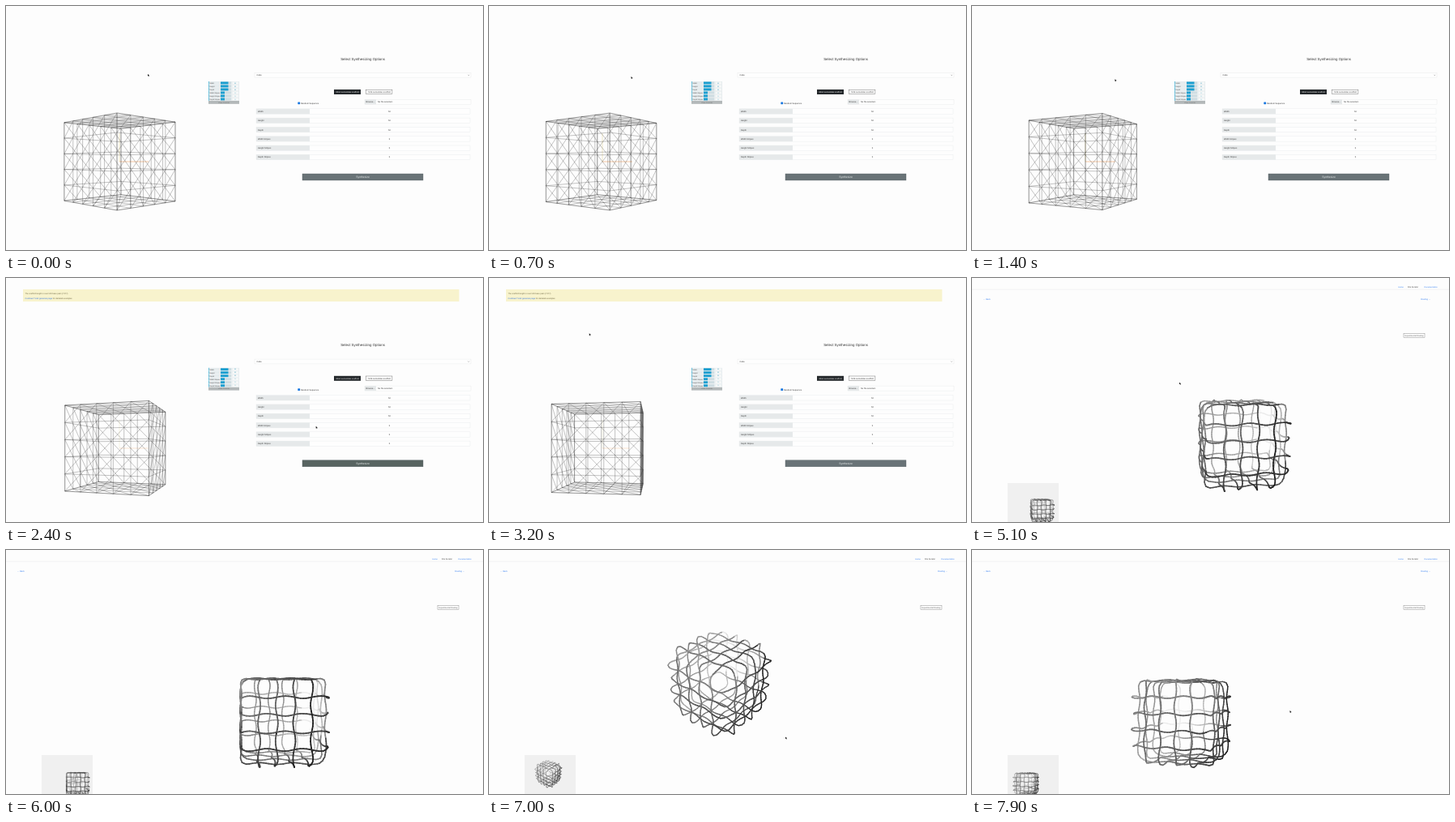
These frames come from a looping animation (589 px wide and 301 px high, 8000 ms). An HTML page with a canvas:

```html
<!DOCTYPE html>
<html>
<head>
<meta charset="utf-8">
<style>
  html, body { margin: 0; width: 100%; height: 100%; overflow: hidden; background: #fdfdfd; }
  canvas, svg { position: absolute; left: 0; top: 0; width: 589px; height: 301px; }
  text { font-family: "Liberation Sans", Arial, sans-serif; text-rendering: geometricPrecision; }
</style>
</head>
<body>
<canvas id="stage" width="589" height="301"></canvas>
<svg id="ui" viewBox="0 0 589 301"></svg>
<script>
const LOOP = 8000, ALERT = 2100, FOCUS_END = 2800, HOVER = 3600, RESULT = 4200;
const ctx = document.getElementById('stage').getContext('2d');
const ui = document.getElementById('ui');

// ---- static interface ----
const rect = (x, y, w, h, fill, stroke = 'none', extra = '') =>
  `<rect x="${x}" y="${y}" width="${w}" height="${h}" fill="${fill}" stroke="${stroke}" stroke-width=".4" ${extra}/>`;
const text = (x, y, size, str, fill = '#333', anchor = 'start') =>
  `<text x="${x}" y="${y}" font-size="${size}" fill="${fill}" text-anchor="${anchor}">${str}</text>`;

const fields = [['Width', 50], ['Height', 50], ['Depth', 50],
  ['Width Stripes', 5], ['Height Stripes', 5], ['Depth Stripes', 5]];

function sliderPanel() {
  const rows = fields.map(([name, value], i) => {
    const y = 93 + i * 4;
    return rect(250, y, 38, 3.8, '#e6ecee') + rect(250, y, .8, 3.8, '#49b4d6') +
      text(251.5, y + 2.8, 2.1, name, '#444') +
      rect(265, y + .5, 13, 2.9, '#cfdde2') +
      rect(265, y + .5, value > 9 ? 9.5 : 5, 2.9, '#1b9fd0') +
      rect(279.5, y + .5, 7.5, 2.9, '#f6f8f8') +
      text(283, y + 2.7, 2, value, '#3b9ab9', 'middle');
  });
  return rows.join('') + rect(250, 117, 38, 3.8, '#b3b8b9') +
    text(269, 119.7, 2.1, 'Close Controls', '#666', 'middle');
}

function form() {
  const rows = fields.map(([name, value], i) => {
    const y = 126.8 + i * 11.3;
    return rect(309, y, 264, 6.4, '#fefefe', '#e7e9ea') + rect(309, y, 66, 6.4, '#e6e9ea') +
      text(311, y + 4.1, 2.6, name) + text(473.5, y + 4.1, 2.6, value, '#333', 'middle');
  });
  return text(440.5, 66.5, 4.4, 'Select Synthesizing Options', '#333', 'middle') +
    rect(307, 82.3, 267, 5.8, '#fefefe', '#e4e6e7') + text(309.5, 86.2, 2.6, 'Cube') +
    '<path d="M570.3 84.8l.9 .9 .9-.9" fill="none" stroke="#555" stroke-width=".4"/>' +
    rect(405, 103, 33, 6, '#24282b') +
    text(421.5, 106.9, 2.5, '8064 nucleotides scaffold', '#eee', 'middle') +
    rect(444.3, 103.2, 32.6, 5.6, '#fefefe', '#555') +
    text(460.6, 106.9, 2.5, '7249 nucleotides scaffold', '#333', 'middle') +
    rect(360.3, 118.4, 2.8, 2.8, '#1676e0', 'none', 'rx=".6"') +
    text(364, 120.9, 2.6, 'Random Sequence') +
    rect(443, 115.3, 131, 6, '#fefefe', '#e4e6e7') + rect(443, 115.3, 14, 6, '#e6e9ea') +
    text(444.5, 119.2, 2.6, 'Browse...') + text(459, 119.2, 2.6, 'No file selected.') +
    rows.join('') + rect(366, 207, 149, 8, '#697377', '#566064', 'id="button"') +
    text(440.5, 212, 3.4, 'Synthesize', '#e8ecec', 'middle');
}

const notice = rect(21, 14, 538.5, 15, '#f8f3cd') +
  text(23.5, 19.6, 2.45, 'The scaffold length is over 500 base pairs (7377).', '#6b6440') +
  text(23.5, 26, 2.5, '<tspan fill="#2a6fe0">Continue? Visit generate page</tspan> for detailed examples', '#6b6440');

const resultPage = rect(0, 13.8, 589, .5, '#e3e5e6') +
  text(526.5, 11.8, 2.4, 'Home', '#2a78f0') + text(538, 11.8, 2.6, 'File Iterator', '#444') +
  text(558.5, 11.8, 2.4, 'Documentation', '#2a78f0') +
  text(14, 26.9, 2.5, '← Back', '#2a78f0') + text(566, 26.9, 2.5, 'Routing →', '#2a78f0', 'end') +
  rect(533, 68.2, 26, 5.2, '#fefefe', '#777') +
  text(546, 71.7, 2.4, 'Experimental Routing', '#555', 'middle');

ui.innerHTML = `<g id="setup">${sliderPanel()}${form()}</g><g id="notice">${notice}</g>
  <g id="result">${resultPage}</g>${rect(0, 299.6, 16, 1.4, '#8d8d8d', 'none', 'id="status"')}
  <path id="arrow" d="M0 0v2.7l.7-.6 .5 1 .5-.3-.5-1h.9z" fill="#111"/>
  <path id="hand" d="M-.6-1.6v2l-.9-.3 1.2 2h2l.4-2-2-.6v-1.1z" fill="#fff" stroke="#222" stroke-width=".4"/>`;
const part = Object.fromEntries([...ui.querySelectorAll('[id]')].map(e => [e.id, e]));
const show = (el, on) => el.style.display = on ? '' : 'none';

// ---- keyframes: [time, ...values] ----
function tween(keys, t) {
  let i = 0;
  while (i < keys.length - 2 && t > keys[i + 1][0]) i++;
  const [a, b] = [keys[i], keys[i + 1]];
  const p = Math.min(1, Math.max(0, (t - a[0]) / (b[0] - a[0])));
  return a.slice(1).map((v, n) => v + (b[n + 1] - v) * p);
}
const pointer = [[0, 175, 84], [1400, 176, 90], [1950, 440, 211], [2150, 440, 211],
  [2400, 383, 183], [3500, 27, 25.5], [4500, 27, 25.5], [5400, 370, 180],
  [6000, 333, 225], [7000, 366, 230.5], [7900, 392.5, 198]];
// yaw and pitch in degrees
const orbit = [[4600, 0, 0], [5300, 10, 8], [6000, 0, 0], [6300, 15, 12],
  [7000, 50, 34], [7900, 71, -3], [8000, 73, -4]];

// ---- triangulated wireframe cube ----
const N = 5, wires = [];
const faces = [ // right, up, outward
  [[1, 0, 0], [0, 1, 0], [0, 0, 1]], [[0, 0, -1], [0, 1, 0], [1, 0, 0]],
  [[-1, 0, 0], [0, 1, 0], [0, 0, -1]], [[0, 0, 1], [0, 1, 0], [-1, 0, 0]],
  [[1, 0, 0], [0, 0, -1], [0, 1, 0]], [[1, 0, 0], [0, 0, 1], [0, -1, 0]]];
for (const [u, v, n] of faces) {
  const at = (i, j) => [0, 1, 2].map(k => u[k] * (i / N - .5) + v[k] * (j / N - .5) + n[k] / 2);
  for (let i = 0; i <= N; i++) {
    wires.push([at(i, 0), at(i, N)], [at(0, i), at(N, i)], [at(i, 0), at(N, N - i)]);
    if (i) wires.push([at(0, i), at(N - i, N)]);
  }
}

function drawCube(t, cy) {
  const yaw = (-47 + 11.7 * t / 1000) * Math.PI / 180, c = Math.cos(yaw), s = Math.sin(yaw);
  const project = ([x, y, z]) => {
    const k = 358 / (3.69 + x * s - z * c);
    return [140 + (x * c + z * s) * k, cy - y * k];
  };
  ctx.lineWidth = .8;
  for (const [color, x, y] of [['#f0a060', 37 * Math.cos(yaw + .6), 0], ['#e6d9a0', 0, -35]]) {
    ctx.strokeStyle = color;
    ctx.globalAlpha = cy > 200 ? .35 : .7;
    ctx.beginPath();
    ctx.moveTo(140, cy);
    ctx.lineTo(140 + x, cy + y);
    ctx.stroke();
  }
  ctx.globalAlpha = 1;
  ctx.strokeStyle = 'rgba(25,25,25,.56)';
  ctx.lineWidth = .45;
  for (const [a, b] of wires) {
    ctx.beginPath();
    ctx.moveTo(...project(a));
    ctx.lineTo(...project(b));
    ctx.stroke();
  }
}

// ---- strand rings wrapped around a cube with one corner at the pivot ----
const clamp = v => Math.min(1, Math.max(0, v));
function square(s) {
  s = (s + 20) % 20;
  const f = s % 5 / 5;
  return [[f, 0], [1, f], [1 - f, 1], [0, 1 - f]][Math.floor(s / 5)];
}
function ringPoint(axis, k, s) {
  const near = [-.35, 0, .35].map(d => square(s + d));
  const flat = [0, 1].map(i => {
    const m = (near[0][i] + near[1][i] + near[2][i]) / 3;
    return .5 + (m - .5) * (1.02 + .02 * Math.cos(Math.PI * (s + k)));
  });
  flat.splice(axis, 0, k / N + .014 * Math.sin(Math.PI * (s + k)));
  return flat;
}
// grey at the upper left, black at the lower front, pale towards the far right
function shade([x, y, z], seed) {
  let light = .06 + .45 * (1 - y) * (1 - x) * (1 - .5 * z) + .5 * z * (.4 + .6 * y) +
    .4 * x * z + .1 * Math.sin(seed * 7.3);
  if (x > .9 && z > .1 && y < .7) light += .35;
  const v = Math.round(28 + 207 * clamp(light));
  return `rgb(${v},${v},${v})`;
}
const strands = [], STEP = 1 / 6;
for (let axis = 0; axis < 3; axis++)
  for (let k = 1; k < N; k++)
    for (let i = 0; i < 120; i++) {
      const a = ringPoint(axis, k, i * STEP), b = ringPoint(axis, k, (i + 1) * STEP);
      strands.push({ a, b, color: shade(a, axis * 5 + k + Math.floor(i / 30)) });
    }

function drawStrands(t) {
  const [yaw, pitch] = tween(orbit, t).map(d => d * Math.PI / 180);
  const c = Math.cos(yaw), s = Math.sin(yaw), cp = Math.cos(pitch), sp = Math.sin(pitch);
  const project = ([x, y, z]) => {
    const d = x * s + z * c, depth = d * cp + y * sp, k = 108 * 3.7 / (3.7 + depth);
    return [(x * c - z * s) * k, (y * cp - d * sp) * k, depth];
  };
  const lines = strands.map(({ a, b, color }) => ({ a: project(a), b: project(b), color }))
    .sort((p, q) => q.a[2] - p.a[2]);
  const paint = (x, y, scale) => {
    ctx.save();
    ctx.translate(x, y);
    ctx.scale(scale, scale);
    ctx.lineCap = 'round';
    for (const { a, b, color } of lines) {
      ctx.strokeStyle = color;
      ctx.lineWidth = 6.4 / (3.7 + a[2]);
      ctx.beginPath();
      ctx.moveTo(a[0], a[1]);
      ctx.lineTo(b[0], b[1]);
      ctx.stroke();
    }
    ctx.restore();
  };
  paint(291, 160, 1);
  ctx.save();
  ctx.beginPath();
  ctx.rect(44, 253, 63, 48);
  ctx.clip();
  ctx.fillStyle = '#f0f0f0';
  ctx.fillRect(44, 253, 63, 48);
  paint(75, 275, .26);
  ctx.restore();
}

function frame(now) {
  const t = now % LOOP, result = t >= RESULT, alerted = t >= ALERT && !result;
  ctx.clearRect(0, 0, 589, 301);
  if (result) drawStrands(t);
  else drawCube(t, alerted ? 210 : 192);

  show(part.setup, !result);
  show(part.notice, alerted);
  show(part.result, result);
  part.setup.setAttribute('transform', `translate(0 ${alerted ? 17.8 : 0})`);
  part.button.setAttribute('fill', alerted && t < FOCUS_END ? '#586461' : '#697377');

  const onLink = t >= HOVER && !result;
  show(part.status, onLink);
  show(part.hand, onLink);
  show(part.arrow, !onLink);
  const [x, y] = tween(pointer, t);
  for (const el of [part.arrow, part.hand]) el.setAttribute('transform', `translate(${x} ${y})`);
  requestAnimationFrame(frame);
}
requestAnimationFrame(frame);
</script>
</body>
</html>
```
